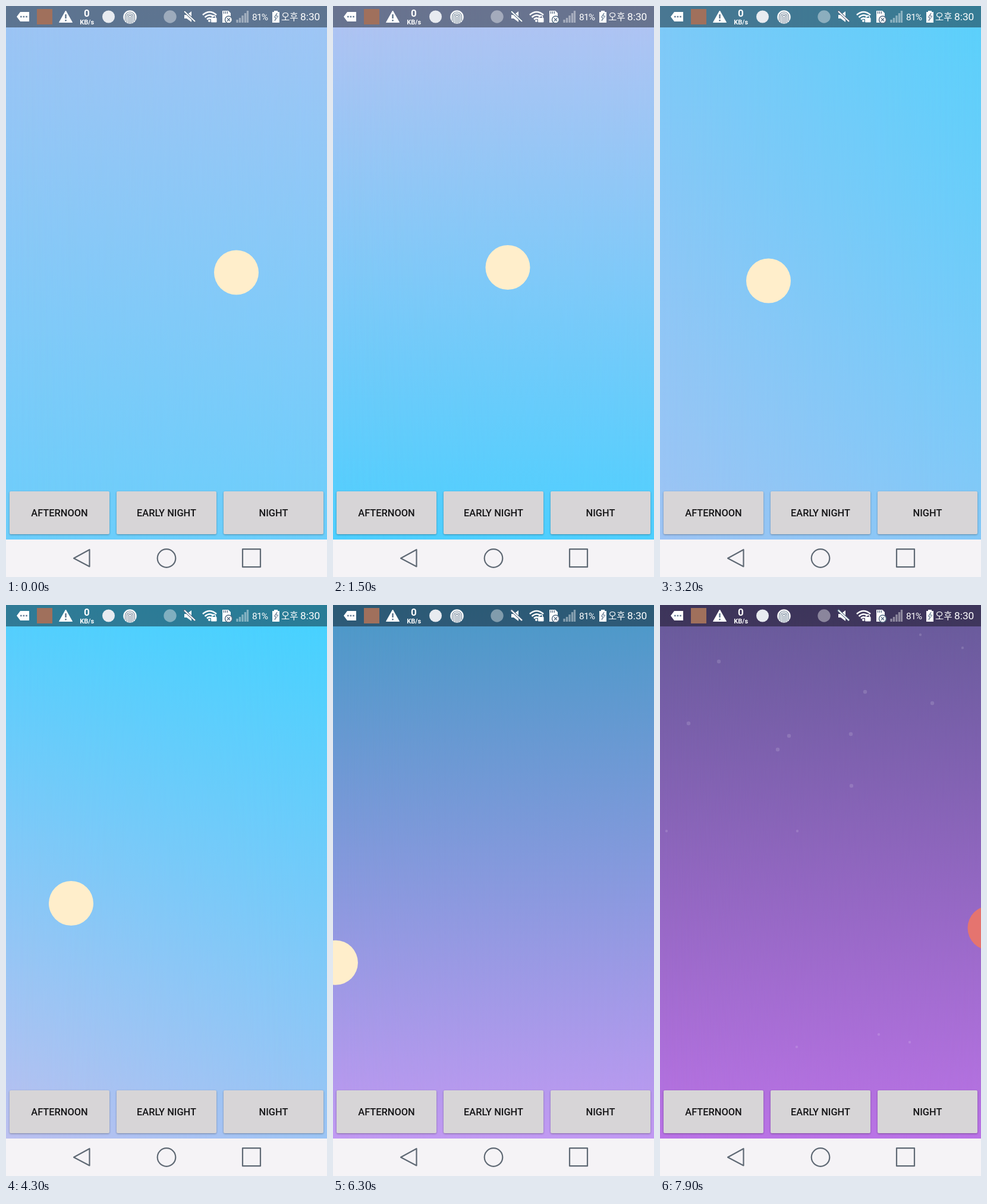
An HTML page for the animation above (8 s loop, 540x960 px).

```html
<!DOCTYPE html>
<html lang="en">
<head>
<meta charset="utf-8">
<title>Day to night sky</title>
<style>
  html, body { margin: 0; width: 100%; height: 100%; overflow: hidden; }
  #stage { position: relative; width: 540px; height: 960px; overflow: hidden; background: #f5f3f6; }
  .sky { position: absolute; inset: 0 0 63px; }
  #right { -webkit-mask-image: linear-gradient(to right, transparent, #000); mask-image: linear-gradient(to right, transparent, #000); }
  svg { position: absolute; inset: 0; }
  .button {
    position: absolute; top: 816px; width: 168px; height: 72px;
    border-radius: 2px; background: #d7d5d7; color: #141416;
    box-shadow: 0 1px 3px rgba(0, 0, 0, .32);
    font: 500 16.4px/73px Roboto, sans-serif; text-align: center;
  }
</style>
</head>
<body>
<div id="stage">
  <div class="sky" id="left"></div>
  <div class="sky" id="right"></div>
  <svg width="540" height="960" viewBox="0 0 540 960">
    <g id="stars" fill="#fff"></g>
    <circle id="sun" r="37.5" fill="#ffeecb"/>
    <circle id="moon" r="37.5" fill="#e5746f"/>
    <rect width="540" height="36" fill="#000" fill-opacity=".41"/>

    <!-- status bar, left -->
    <path d="M18 18l6-8h15v16H24z" fill="#fff"/>
    <path d="M24 18h12" stroke="#667c94" stroke-width="2.6" stroke-dasharray="2.6 2"/>
    <rect x="52" y="5" width="26" height="26" fill="#a0705c"/>
    <path d="M100.5 8L111.5 27.5H89.5z" fill="#fff" stroke="#fff" stroke-linejoin="round"/>
    <path d="M100.5 14v7m0 2v2.5" stroke="#5c728a" stroke-width="2.4"/>
    <circle cx="172.500" cy="18" r="10.5" fill="#e8ebf0"/>
    <circle cx="208.5" cy="18.5" r="11.2" fill="#fff"/>
    <path d="M200.5 25v-7a8 8 0 0 1 16 0v7M203.2 28v-10a5.300 5.300 0 0 1 10.600 0v10M206 29v-11a2.600 2.600 0 0 1 5.200 0v11M208.600 18v11"
      fill="none" stroke="#6f8296" stroke-width="1.1"/>

    <!-- status bar, right -->
    <circle cx="276" cy="18" r="10.7" fill="#fff" fill-opacity=".4"/>
    <path d="M300 15h4l8-6v18l-8-6h-4z" fill="#fff"/>
    <path d="M299 8l19 18" stroke="#536a82" stroke-width="4"/>
    <path d="M300 9l18 17" stroke="#fff" stroke-width="2"/>
    <g fill="none" stroke="#fff" stroke-width="2.6">
      <path d="M331 15q11.500-10 23 0M334.500 19q8-7 15-1M338 22.500q4-3.500 7-1"/>
      <path d="M346.500 21v-2a3 3 0 0 1 6 0v2" stroke-width="1.6"/>
    </g>
    <circle cx="342" cy="25" r="2" fill="#fff"/>
    <rect x="345" y="20" width="9.5" height="7.5" rx="1" fill="#fff"/>
    <path d="M364 8h10l4 4v16h-14z" fill="#fff"/>
    <path d="M366.500 9v4m3-4v4m3-4v4" stroke="#5c728a" stroke-width="1.3"/>
    <circle cx="374.5" cy="23" r="6" fill="#fff" stroke="#566d85" stroke-width="1.5"/>
    <path d="M372 20.500l5 5m0-5l-5 5" stroke="#566d85" stroke-width="1.4"/>
    <path d="M389 28v-5m4.500 5v-8m4.500 8v-12m4.500 12v-16m4 16v-20" stroke="#fff" stroke-opacity=".42" stroke-width="3.3"/>
    <path d="M451 8h6v2h3v18h-12v-18h3z" fill="#fff"/>
    <path d="M456 12l-5 7h3l-2 6 6-8h-4z" fill="none" stroke="#637990" stroke-width="1"/>
    <g fill="#fff" font-family="Roboto, sans-serif">
      <text x="136" y="18" font-size="17" font-weight="700" text-anchor="middle">0</text>
      <text x="136.2" y="30.5" font-size="11" font-weight="700" text-anchor="middle">KB/s</text>
      <text x="414" y="24" font-size="15.5" letter-spacing="-.8">81%</text>
      <text x="463" y="24" font-size="15.5" font-family="'Noto Sans CJK KR', 'Noto Sans CJK', sans-serif">오후</text>
      <text x="495" y="24" font-size="17.3">8:30</text>
    </g>

    <!-- navigation bar -->
    <rect y="897" width="540" height="63" fill="#f5f3f6"/>
    <g fill="none" stroke="#5f6974" stroke-width="2.2" stroke-linejoin="round">
      <path d="M114 928.500L140.500 914v28.500z"/>
      <circle cx="270" cy="928.5" r="15.3"/>
      <rect x="398" y="913.2" width="30" height="30"/>
    </g>
  </svg>
  <div class="button" style="left:6px">AFTERNOON</div>
  <div class="button" style="left:186px">EARLY NIGHT</div>
  <div class="button" style="left:366px">NIGHT</div>
</div>
<script>
const LOOP = 8000, STEP = 100;
const $ = id => document.getElementById(id);

// time, then corner colours: top left, bottom left, top right, bottom right
const SKY = [
  [0, 0x9ec4f4, 0x6ccefb, 0xa0c5f4, 0x6ccefb],
  [1500, 0xb2c3f2, 0x4ecffe, 0xb2c3f2, 0x4ecffe],
  [3200, 0x7ccaf8, 0x9ec4f4, 0x5ad0fb, 0x84c8f7],
  [4300, 0x50d0fe, 0xbcc0f0, 0x44d2ff, 0x9cc4f4],
  [5300, 0x48d0fc, 0xbcbcf2, 0x46d0fd, 0xb8bcf2],
  [5600, 0x48c6f2, 0xbab6f0, 0x48c6f2, 0xbab6f0],
  [7000, 0x4c6c9d, 0xc87df4, 0x4c6c9d, 0xc87df4],
  [8000, 0x6a5899, 0xb872e4, 0x6a5899, 0xb872e4]
];

// time, x, y
const SUN = [
  [0, 387.5, 448], [1500, 294, 439.5], [3200, 182.5, 462],
  [4300, 109.5, 501.5], [5600, 39.5, 566], [7000, -30.5, 637], [8000, -84, 690]
];

const STARS = [
  [99, 95], [345, 146], [458, 165], [48, 199], [217, 220], [321, 217], [198, 243], [322, 304],
  [438, 50], [509, 72], [230, 743], [420, 735], [11, 380], [231, 380], [368, 722]
];
$('stars').innerHTML = STARS.map(([x, y], i) =>
  `<circle cx="${x}" cy="${y}" r="${i < 8 ? 3.2 : 2.2}"/>`).join('');

function segment(keys, t) {
  let i = 0;
  while (i < keys.length - 2 && t >= keys[i + 1][0]) i++;
  return [i, (t - keys[i][0]) / (keys[i + 1][0] - keys[i][0])];
}

function mix(a, b, u) {
  const part = s => {
    const p = a >> s & 255, q = b >> s & 255;
    return p + (q - p) * u;
  };
  return `rgb(${part(16)},${part(8)},${part(0)})`;
}

// smooth curve through the keys
function along(keys, t, axis) {
  const [i, u] = segment(keys, t);
  const slope = k => {
    const a = keys[Math.max(k - 1, 0)], b = keys[Math.min(k + 1, keys.length - 1)];
    return (b[axis] - a[axis]) / (b[0] - a[0]);
  };
  const a = keys[i], b = keys[i + 1], d = b[0] - a[0], v = 1 - u;
  return a[axis] * (1 + 2 * u) * v * v + b[axis] * u * u * (3 - 2 * u)
    + d * u * v * (v * slope(i) - u * slope(i + 1));
}

function place(id, x, y) {
  $(id).setAttribute('cx', x);
  $(id).setAttribute('cy', y);
}

function draw(t) {
  const [i, u] = segment(SKY, t);
  const c = SKY[i].slice(1).map((color, k) => mix(color, SKY[i + 1][k + 1], u));
  $('left').style.background = `linear-gradient(${c[0]}, ${c[1]})`;
  $('right').style.background = `linear-gradient(${c[2]}, ${c[3]})`;
  place('sun', along(SUN, t, 1), along(SUN, t, 2));
  const late = (t - 7900) / 1000;
  place('moon', 555 - 54 * late, 543 - 48 * late);
  $('stars').setAttribute('opacity', Math.max(0, (t - 7000) / 900 * .14));
}

const start = performance.now();
function tick() {
  const t = (performance.now() - start) % LOOP;
  draw(Math.floor(t / STEP) * STEP);
  requestAnimationFrame(tick);
}
tick();
</script>
</body>
</html>
```
